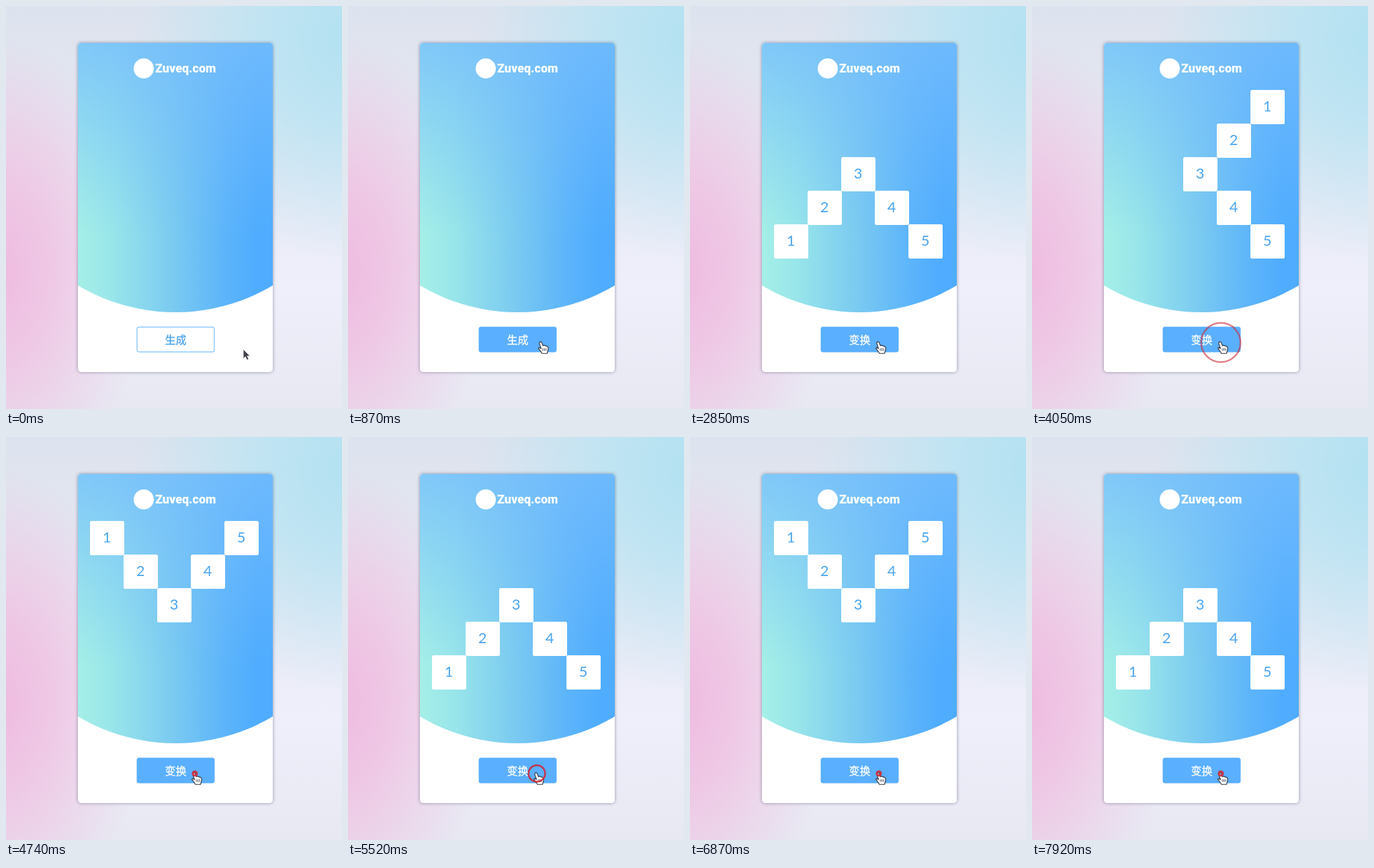
An HTML page that plays this animation: 500x600 px, repeating every 8000 ms.

```html
<!DOCTYPE html>
<html lang="zh">
<head>
<meta charset="utf-8">
<title>Windmill</title>
<style>
  html, body { margin: 0; width: 100%; height: 100%; overflow: hidden; }
  body {
    position: relative;
    background:
      radial-gradient(ellipse 230px 350px at -20px 395px, #efb9df, #efc2e2d0 42%, #ecd4e800),
      radial-gradient(ellipse 330px 330px at 520px 50px, #b1e1f1, #bae4f3d8 40%, #d8ebf700),
      linear-gradient(#dde3ee, #e6e8f3 35%, #eeeffa 70%, #e7e8f2);
  }
  .card, .shade, .cell, .btn, .mark, .name, svg { position: absolute; }
  .card, .shade { left: 107px; top: 55px; width: 290px; height: 490px; border-radius: 5px; }
  .card { overflow: hidden; background: #fff; }
  .shade { box-shadow: 0 0 5px rgba(70, 70, 100, .55); }
  .sky {
    position: absolute; inset: 0;
    clip-path: circle(283px at 145px 118px);
    background:
      linear-gradient(rgba(118, 189, 253, .78), rgba(118, 189, 253, 0) 58%),
      linear-gradient(90deg, #a5efe7, #98e5ea 18%, #79c9f1 50%, #5cb4fa 76%, #4facfe 92%);
  }
  .mark { left: 190px; top: 78px; width: 30px; height: 30px; border-radius: 50%; background: #fff; }
  .name {
    left: 222px; top: 80px; white-space: nowrap; color: #fff;
    font: 900 18px/26px Roboto, "Open Sans", sans-serif;
  }
  .btn {
    left: 194px; top: 477px; width: 116px; height: 38px; box-sizing: border-box;
    transform: translate(.5px, .5px);
    border: 1px solid #5aaefd; border-radius: 3px; background: #fff; color: #4ba3ec;
    font: 500 16px/34px "Noto Sans CJK SC", "Noto Sans CJK", sans-serif; text-align: center;
    -webkit-text-stroke: .3px;
  }
  .btn.hot { background: #5aaffe; color: #fff; }
  .cell {
    left: 225px; top: 225px; width: 50.5px; height: 50.5px; border-radius: 2.5px;
    background: #fff; color: #4ba5ef; text-align: center;
    font: 22px/48px Lato, sans-serif;
  }
  svg { left: 0; top: 0; }
</style>
</head>
<body>
<div class="shade"></div>
<div class="card"><div class="sky"></div></div>
<div class="mark"></div>
<div class="name">Zuveq.com</div>
<div class="btn">生成</div>
<svg width="500" height="600">
  <g id="pointer">
    <path id="arrow" d="M0 0V14.2L3.2 11.2L5.6 16.2L8.3 15L6 10.2H10.2Z" fill="#42424c" stroke="#fff" stroke-width=".9"/>
    <g id="hand" stroke="#30303c" stroke-linejoin="round" transform="translate(0 -.5) scale(1.08)">
      <path d="M-2.6 .4Q-1.3 -1.6 .5 .6L2.2 5L3.2 4.2L5 4.7L6 5.2L7.5 5.4L9 6.8Q10 9 8.6 12.6L8 15.5H.8L-1.5 11.8L-4 8.6Q-3.8 6.8 -1.6 8L-.5 8.7L-2.8 2Z" fill="#fff" stroke-width="1.1"/>
      <path d="M2 8.4V12M4.2 8.4V12M6.4 8.4V12" stroke-width=".8"/>
    </g>
  </g>
  <circle id="ring" cx="281" cy="501" fill="none" stroke="#cf2b3b"/>
</svg>
<script>
  const LOOP = 8000, RING = 480;
  // press and release time of every click
  const clicks = [
    [2310, 2370], [3600, 3750], [4200, 4320], [4740, 4860], [5280, 5400],
    [5820, 5940], [6330, 6450], [6870, 6990], [7380, 7500], [7920, 8040]
  ];
  // pointer stops: time, x, y
  const stops = [
    [150, 353, 511], [690, 281, 501], [840, 281, 501],
    [990, 343, 501], [1290, 343, 501], [1650, 281, 501]
  ];
  // the windmill's turns: arms down, right, up, left; d = offset from the middle cell
  const shapes = [
    d => [d, Math.abs(d)],
    d => [Math.abs(d), d],
    d => [d, -Math.abs(d)],
    d => [-Math.abs(d), d]
  ];

  const $ = id => document.getElementById(id);
  const btn = document.querySelector('.btn');
  const svg = document.querySelector('svg');
  const cells = [1, 2, 3, 4, 5].map(n => {
    const el = document.createElement('div');
    el.className = 'cell';
    el.textContent = n;
    svg.before(el);
    return el;
  });
  const ease = p => p * p * (3 - 2 * p);

  function pointerAt(t) {
    const next = stops.findIndex(s => s[0] > t);
    if (next === 0) return stops[0].slice(1);
    if (next < 0) return stops[stops.length - 1].slice(1);
    const [t0, x0, y0] = stops[next - 1], [t1, x1, y1] = stops[next];
    const p = ease((t - t0) / (t1 - t0));
    return [x0 + (x1 - x0) * p, y0 + (y1 - y0) * p];
  }

  function drawRing(t) {
    const last = clicks.filter(c => c[0] <= t).pop();
    const p = last ? (t - last[1]) / RING : 1;
    const down = p < 0;
    $('ring').setAttribute('r', down ? 3 : Math.max(3, 1 + 45 * p));
    $('ring').setAttribute('stroke-width', down ? 3 : 2.5);
    $('ring').setAttribute('opacity', p < 1 ? (down ? .95 : 1 - p * p) : 0);
  }

  function draw(t) {
    const [x, y] = pointerAt(t);
    const hot = x < 311;
    $('pointer').setAttribute('transform', `translate(${x} ${y})`);
    $('arrow').style.display = hot ? 'none' : '';
    $('hand').style.display = hot ? '' : 'none';
    btn.classList.toggle('hot', hot);

    const done = clicks.filter(c => c[1] <= t).length;
    btn.textContent = done ? '变换' : '生成';
    cells.forEach((el, i) => {
      el.style.display = done ? '' : 'none';
      if (!done) return;
      const [cx, cy] = shapes[(done - 1) % 4](i - 2);
      el.style.transform = `translate(${cx * 50}px, ${cy * 50}px)`;
    });
    drawRing(t);
  }

  const start = performance.now();
  function tick() {
    draw((performance.now() - start) % LOOP);
    requestAnimationFrame(tick);
  }
  tick();
</script>
</body>
</html>
```
